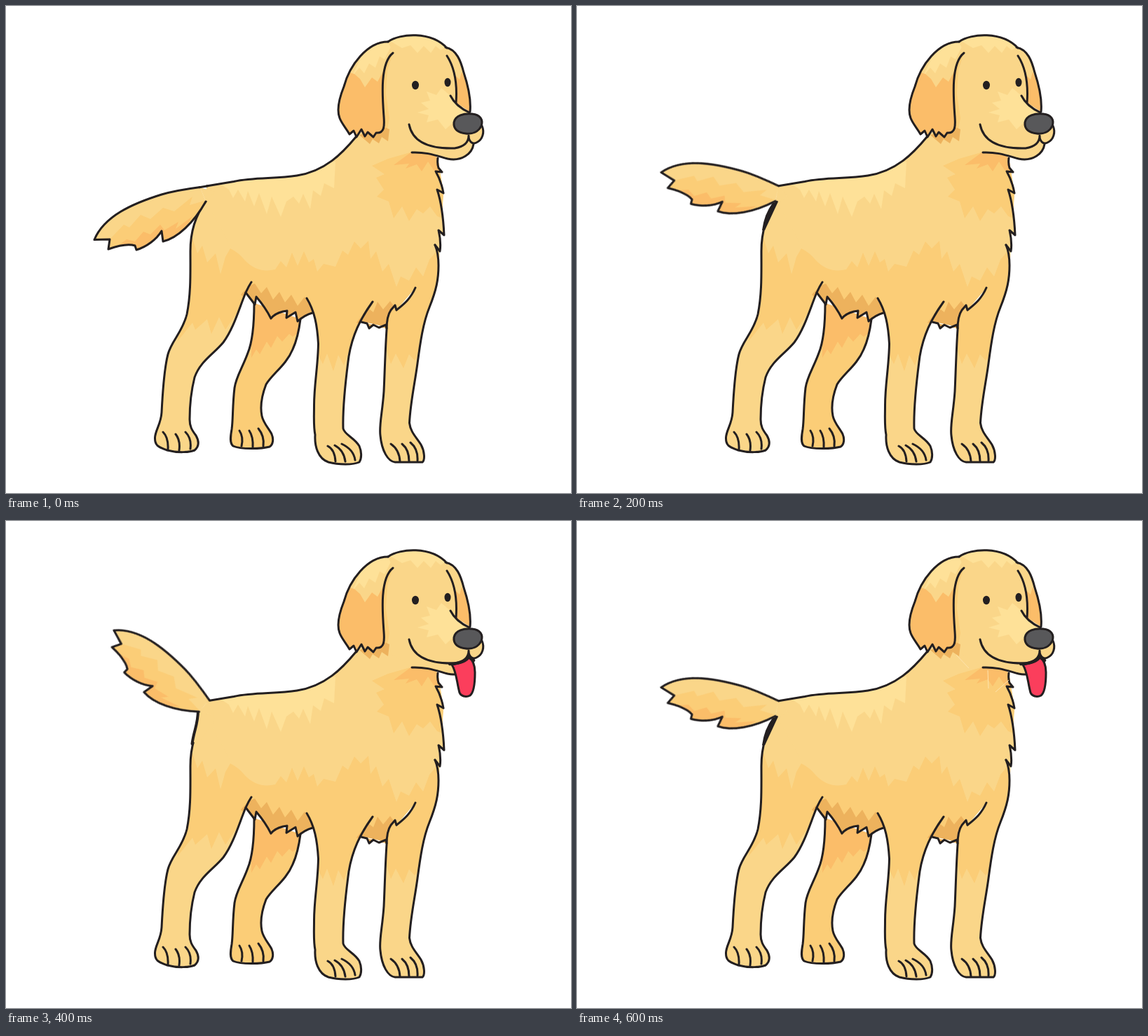
Write an HTML page that moves like this. It is 806 px wide and 695 px high and loops after 800 ms.

```html
<!DOCTYPE html>
<html lang="en">
<head>
<meta charset="utf-8">
<title>Happy dog</title>
<style>
  html, body { margin: 0; width: 100%; height: 100%; overflow: hidden; background: #fff; }
  svg { display: block; width: 100%; height: 100%; }
  .base { fill: #fad689; }
  .light { fill: #fee198; }
  .shade { fill: #fbcd77; }
  .warm { fill: #fbbd69; }
  .deep { fill: #edb25d; }
  .ink { fill: none; stroke: #231f20; stroke-width: 3; stroke-linecap: round; stroke-linejoin: round; }
  .dark { fill: #231f20; }

  .tail { transform-origin: 285px 270px; animation: wag .8s step-end infinite; }
  .low { animation: low .8s step-end infinite; }
  .mid { animation: mid .8s step-end infinite; }
  .high { animation: high .8s step-end infinite; }
  .tongue { animation: pant .8s step-end infinite; }
  .seam { animation: seam .8s step-end infinite; }

  @keyframes wag {
    0% { transform: rotate(0deg); }
    25%, 75% { transform: translate(3px, .8px) rotate(33deg); }
    50% { transform: translate(-1.5px, -2px) rotate(62.6deg); }
  }
  @keyframes low { 0% { opacity: 1; } 25%, 100% { opacity: 0; } }
  @keyframes mid { 0%, 50% { opacity: 0; } 25%, 75% { opacity: 1; } }
  @keyframes high { 0%, 75%, 100% { opacity: 0; } 50% { opacity: 1; } }
  @keyframes pant { 0% { opacity: 0; } 50%, 100% { opacity: 1; } }
  @keyframes seam { 0% { opacity: 0; } 75%, 100% { opacity: 1; } }
</style>
</head>
<body>
<svg viewBox="0 0 806 695">
  <defs>
    <path id="torso" d="M286 257L325 250.500C355 244 385 247 415 242C455 236 480 210 499 187L540 150L616 217L624 266L617 375L584 402L557 434L543 458L507 450L523 422L437 438L342 409L350 394L263 350L285 279Z"/>
    <path id="haunch" d="M285 279C270 299 263 325 263 350C263 380 264 410 258 440C252 465 236 478 231 497C225 520 223 560 222 580C221 597 213 605 212.500 616C212 629 220 630 230 634C245 638 262 637 269 634C276 628 275 620 271 613C265 605 262 600 262 590C262 570 264 550 269 530C277 507 296 497 310 480C325 460 333 430 342 409Q346 400 350 394"/>
    <path id="belly" d="M342 409L355 426L357 415Q370 430 378 446Q383 439 395 436L401 435L400 445L413 437L416 450Q426 441 437 438"/>
    <path id="foreleg" d="M429 417C440 435 444 455 445.500 482C445 515 439.500 540 439.500 570C439.500 588 438.500 600 441 612C440 628 445 646 460 651C475 655 495 655 504 651C508 645 507 635 504 628C497 616 483 612 481 603C480 570 485 530 489 500C494 470 505 447 523 422"/>
    <path id="outleg" d="M584 402C577 418 568 425 557 434L555 427L549 434C544 441 543 452 543 462C541 490 540 530 539 550C537 580 532 598 534 613C536 635 545 650 555 651L594 651C598 648 597 635 592 626C585 615 577 608 575.500 595C577 565 583 540 587 510C591 480 595 452 604 430C614 405 617 390 617 370Q617 353 612 341"/>
    <path id="brisket" d="M507 451L515 453L518 460L524 455L532 459L542 455L543 460"/>
    <path id="chest" d="M616 217Q615 226 617 231L622 237L613 236Q621 250 624 267L615 262C622 283 624 305 625 327L617 320Q621 337 619 350L612 341"/>
    <path id="hindleg" d="M354 424C354 450 352 478 345 495C338 515 328 529 326 545C323 570 324 590 322 604C320 615 319 624 324 628C335 633 365 632 376 629C381 626 382 618 379 611C375 603 367 595 365 585C362 570 366 553 371 540C380 525 400 512 409 490C415 477 418 463 420 447"/>
    <path id="ear" d="M545 51C515 51 490 85 482 115C474 135 472 150 476 160C479 168 485 174 490 183L496 178L500 187L507 176L512 186L516 180L524 187L528 181C540 182 540 171 539 158C537 130 533 82 552 67"/>
    <path id="farEar" d="M627 59C643 62 649 79 653 95C658 110 664 130 662 151L642 138C644 110 641 88 629 71"/>
    <path id="head" d="M545 51C562 39 606 35.500 629 60L642 100L642 138L661 152L680 175C681 188 676 195 667 197C665 212 650 222 630 218C615 214 600 208 579 209L535 180L537 80Z"/>
    <path id="brush" d="M277 258.500C258 261 239 264 222 269C180 282 140 300 126 333.500L148 333L146 347C160 342 175 339 184 342L186 348C200 344 215 333 222 321L224 336C245 331 268 309 285 279"/>

    <clipPath id="inBody">
      <use href="#torso"/><use href="#haunch"/><use href="#belly"/><use href="#foreleg"/>
      <use href="#outleg"/><use href="#brisket"/><use href="#chest"/>
    </clipPath>
    <clipPath id="inHind"><use href="#hindleg"/></clipPath>
    <clipPath id="inEar"><use href="#ear"/></clipPath>
    <clipPath id="inFarEar"><use href="#farEar"/></clipPath>
    <clipPath id="inHead"><use href="#head"/></clipPath>
    <clipPath id="inTail"><use href="#brush"/></clipPath>

    <g id="limbs">
      <use href="#haunch"/><use href="#belly"/><use href="#foreleg"/>
      <use href="#outleg"/><use href="#brisket"/><use href="#chest"/>
    </g>
  </defs>

  <!-- far hind leg -->
  <use href="#hindleg" class="shade"/>
  <path class="warm" clip-path="url(#inHind)" d="M350 415L422 440L417 466L409 472L404 468L394 479L387 471L378 488L372 479L362 497L357 490L350 502Z"/>
  <use href="#hindleg" class="ink"/>
  <path class="ink" d="M333 606Q339 615 336 628M347 606Q353 615 352 630M360 603Q369 614 367 628"/>

  <!-- body -->
  <g class="base"><use href="#torso"/><use href="#limbs"/></g>
  <g clip-path="url(#inBody)">
    <path class="light" d="M300 250L318 262L324 274L331 262L341 279L345 264L354 286L361 267L372 297L379 272L392 301L400 279L410 272L418 282L424 268L434 290L438 263L449 271L454 253L468 260L470 222L400 235Z"/>
    <path class="shade" d="M255 325L266 331L273 353L280 342L287 366L299 353L306 383L313 358L320 346Q332 352 340 362Q358 382 384 376L392 364L400 373L408 352L416 371L425 350L432 366L439 361L444 379L453 368L470 372L480 349L488 355L497 336L506 346L517 335L520 361L528 350L537 379L546 368L557 401L563 386L575 392L585 373L595 386L604 362L616 348L630 400L591 495L583 506L575 497L567 517L556 496L549 511L540 483L540 440L500 460L490 490L482 513L474 498L467 521L458 496L452 511L440 487L425 430L345 412L328 440L313 462L304 444L293 468L287 447L270 462L266 452L245 478Z"/>
    <path class="deep" d="M335 412L346 400L355 396L364 410L372 401L381 419L390 408L398 423L407 412L416 428L426 415L440 437L416 455L380 450Z"/>
    <path class="deep" d="M500 452L516 431L524 437L530 422L538 433L548 421L554 429L547 442L543 465Z"/>
    <path class="shade" d="M522 228L545 218L580 208L625 214L628 305L615 300L605 286L595 296L586 290L575 307L565 286L553 303L546 279L529 272L539 262L528 245L540 240Z"/>
    <path class="warm" d="M553 227L580 207L618 215L618 240L610 234L602 222L593 236L586 226L570 232L575 225Z"/>
  </g>
  <use href="#limbs" class="ink"/>
  <path class="ink" d="M286 257L325 250.500C355 244 385 247 415 242C455 236 480 210 499 187"/>
  <path class="ink" d="M224 608Q232 616 231 633M242 611Q249 620 247 634M256 608Q265 617 263 632M459 628Q469 633 470 650M469 627Q482 634 484 650M479 625Q496 633 498 648M549 625Q561 633 562 650M565 625Q575 633 575 650M577 623Q588 632 587 649"/>

  <!-- rump and tail -->
  <g class="high">
    <path class="base" d="M292 261L274 270C274 290 267 305 265 314L273 318L298 285Z"/>
    <path class="ink" style="stroke-width:4" d="M274 270C274 290 268 299 265.500 318"/>
  </g>
  <g class="tail">
    <path class="base" d="M277 259L298 265L285 279Z"/>
    <use href="#brush" class="base"/>
    <g clip-path="url(#inTail)">
      <path class="shade" d="M146 335L168 312L176 316L192 298L206 304L224 288L240 293L266 272L262 284L283 278L266 312L224 342L146 358Z"/>
      <path class="warm" d="M152 348L172 333L184 336L196 322L206 326L220 312L226 320L246 308L242 318L266 300L250 328L224 342L186 354Z"/>
    </g>
    <use href="#brush" class="ink"/>
  </g>
  <path class="low ink" d="M276 258.700L288 256.700"/>
  <path class="mid dark" d="M287 279L268 320L264 320Q267 297 279 281Z"/>

  <!-- head -->
  <use href="#farEar" class="base"/>
  <path class="warm" clip-path="url(#inFarEar)" d="M640 98L647 105L650 94L655 106L668 100L668 155L640 145Z"/>
  <use href="#head" class="base"/>
  <g clip-path="url(#inHead)">
    <path class="light" d="M548 50L560 38L610 36L628 58L620 63L613 57L606 67L596 57L587 67L577 56L565 60Z"/>
    <path class="light" d="M587 152L603 147L592 138L605 135L600 122L614 127L621 117L634 128L662 152L638 166L627 176L616 162L600 166L603 156Z"/>
    <path class="shade" d="M552 66L544 92L542 125L547 160L543 182L535 180L535 85Z"/>
  </g>
  <path class="deep" d="M504 184L519 197L523 190L532 196L536 187L545 193L547 176L538 172Z"/>
  <use href="#ear" class="base"/>
  <g clip-path="url(#inEar)">
    <path class="light" d="M494 100L506 74L530 50L552 52L540 76L533 72L527 88L518 82L511 96L504 88Z"/>
    <path class="warm" d="M476 108L490 95L497 97L505 104L512 116L522 102L530 108L542 86L545 192L470 192Z"/>
  </g>
  <use href="#ear" class="ink"/>
  <path class="ink" d="M545 51C562 39 606 35.500 629 60M627 59C643 62 649 79 653 95C658 110 664 130 662 151M629 71C640 88 644 110 642 138M634 128C640 140 650 147 661 152"/>
  <path class="ink" d="M575 169C580 195 605 204 640 203C652 201 660 196 660 185C660 193 665 198 671 195C680 191 683 180 679 171M579 209C600 208 615 214 630 218C650 222 665 211 667 197"/>
  <ellipse class="dark" cx="584" cy="113" rx="5" ry="6.200"/>
  <ellipse class="dark" cx="630" cy="109" rx="4.500" ry="6.200"/>
  <path class="ink" style="fill:#58585a" d="M639 166C641 156 653 153 665 154C677 155 681 163 678 171C674 180 665 183 656 182C645 181 638 176 639 166Z"/>

  <g class="tongue">
    <path class="ink" style="fill:#fb3e5c" d="M636 205C648 203 657 200 660 194C667 199 669 207 669 216C669 231 667 245 662 249C656 252 649 250 647 245C643 231 643 216 636 205Z"/>
    <path class="ink" style="stroke-width:4.500" d="M633 204Q655 203 660 194L667 199"/>
  </g>
  <path class="seam" fill="none" stroke="#fde3ad" d="M541 191L559 210M586 213L587 239M597 244L616 227"/>
</svg>
</body>
</html>
```
